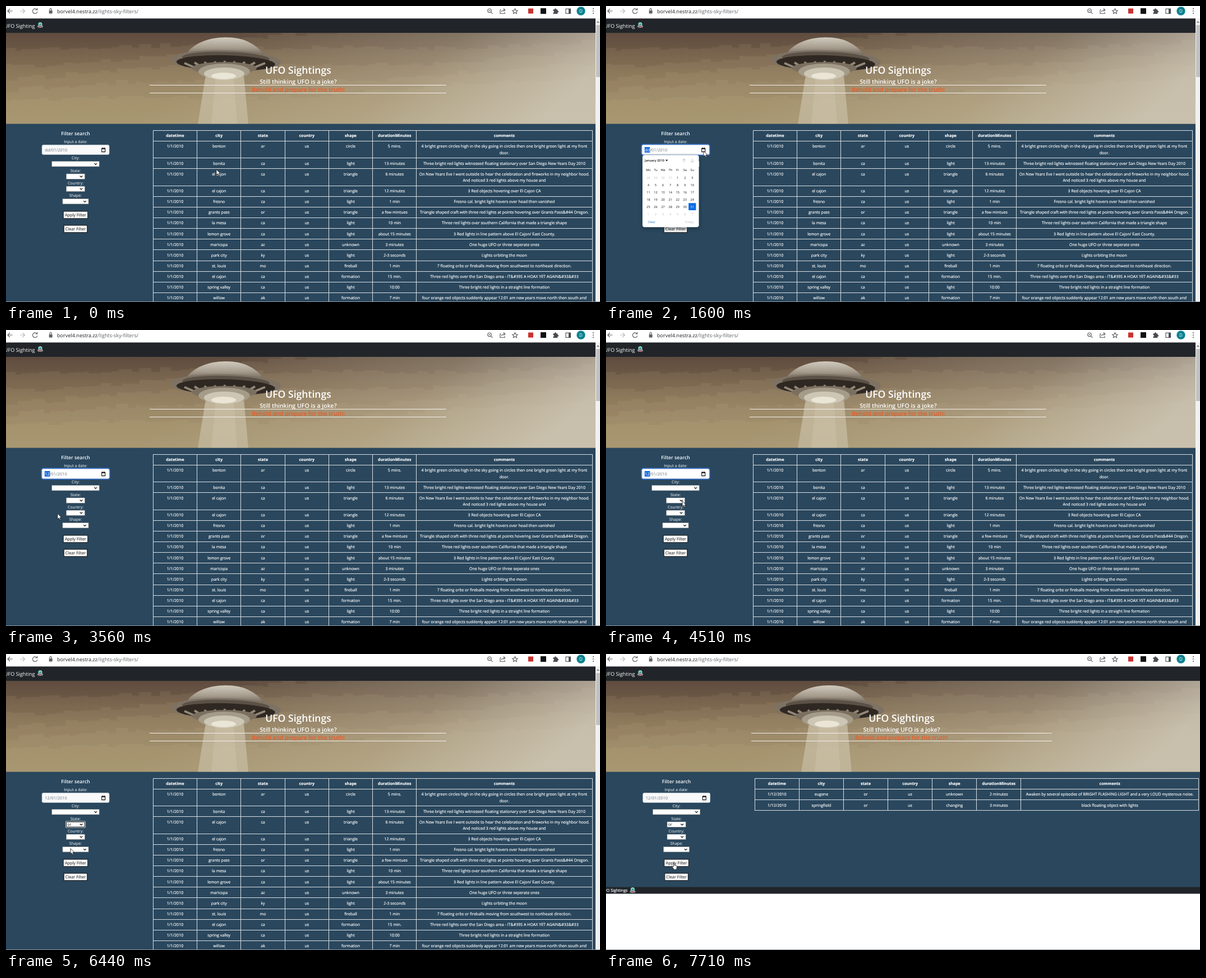
These frames come from a looping animation (1059x529 px, 8000 ms). An HTML page:

```html
<!DOCTYPE html>
<html lang="en">
<head>
<meta charset="utf-8">
<title>UFO Sightings</title>
<style>
  html, body { margin: 0; width: 100%; height: 100%; overflow: hidden; background: #fff; }
  svg { display: block; width: 1059px; height: 529px; }
  text {
    font: 7.07px "Open Sans", "Noto Sans", sans-serif;
    fill: #fff; text-rendering: geometricPrecision; white-space: pre;
  }
  .table text { stroke: #fff; stroke-width: .16px; }
  .mid { text-anchor: middle; }
  .end { text-anchor: end; }
  .th { font-weight: 700; }
  .nav { font-size: 9.1px; }
  .url { font-size: 9.1px; fill: #202124; }
  .path { fill: #5f6368; }
  .h1 { font-size: 17.6px; font-weight: 600; }
  .h2 { font-size: 10.6px; font-weight: 600; }
  .h3 { font-size: 10.3px; font-weight: 600; fill: #ee5a24; }
  .side { font-size: 8.7px; font-weight: 600; }
  .date { font-size: 7.4px; fill: #6c757d; }
  .btn { font-size: 7.3px; fill: #111; }
  .cal { font-size: 5.6px; fill: #111; }
  .opt { fill: #111; }
  .line { fill: none; stroke: #5f6368; stroke-width: 1.2; }
</style>
</head>
<body>
<svg id="stage" viewBox="0 0 1059 529">
  <defs>
    <linearGradient id="sky" x2="0" y2="1">
      <stop offset="0" stop-color="#5f4c3f"/><stop offset=".25" stop-color="#715c47"/>
      <stop offset=".5" stop-color="#816b50"/><stop offset="1" stop-color="#8f7a58"/>
    </linearGradient>
    <linearGradient id="haze" x1=".4" x2="1.05" y2=".12">
      <stop offset="0" stop-color="#d2ccbd" stop-opacity="0"/>
      <stop offset=".55" stop-color="#d2ccbd" stop-opacity=".24"/>
      <stop offset="1" stop-color="#d2ccbd" stop-opacity=".78"/>
    </linearGradient>
    <linearGradient id="dome" x2="0" y2="1">
      <stop offset="0" stop-color="#d0cabd"/><stop offset=".5" stop-color="#a89e90"/>
      <stop offset="1" stop-color="#5e5448"/>
    </linearGradient>
    <linearGradient id="beam" x2="0" y2="1">
      <stop offset="0" stop-color="#d8d0ba" stop-opacity=".6"/>
      <stop offset="1" stop-color="#d0c8b2" stop-opacity=".5"/>
    </linearGradient>
    <filter id="soft" x="-20%" y="-20%" width="140%" height="140%"><feGaussianBlur stdDeviation="3"/></filter>
    <clipPath id="heroClip"><rect y="48" width="1059" height="162.5"/></clipPath>
    <g id="badge">
      <circle cy="-1.5" r="3.6" fill="#7fd3cd"/>
      <circle cy="-1" r="1.6" fill="#2f8f8a"/>
      <ellipse cy="2.4" rx="5" ry="2.5" fill="#8fa3ad"/>
      <ellipse cy="3" rx="3.4" ry="1.1" fill="#c0504a"/>
    </g>
  </defs>

  <rect width="1059" height="529" fill="#2a475d"/>
  <rect y="22" width="1059" height="26.5" fill="#212529"/>
  <text class="nav end" x="51.5" y="39">UFO Sighting</text>
  <use href="#badge" x="61" y="34"/>

  <g clip-path="url(#heroClip)">
    <rect y="48" width="1059" height="163" fill="url(#sky)"/>
    <g id="bands"></g>
    <rect y="48" width="1059" height="163" fill="url(#haze)"/>
    <g id="hero">
      <path d="M356 124H424L432 211H342Z" fill="url(#beam)"/>
      <path d="M374 124H406L412 211H366Z" fill="#e9e4d2" opacity=".15"/>
      <path d="M318 90C332 67 360 56 392 56S446 67 464 92Z" fill="url(#dome)"/>
      <g transform="rotate(1.5 392 98)">
        <ellipse cx="392" cy="98" rx="98" ry="19" fill="#7d7264"/>
        <ellipse cx="392" cy="93" rx="78" ry="11" fill="#5b5146"/>
        <ellipse cx="392" cy="102" rx="88" ry="14" fill="#2f2822"/>
      </g>
      <g id="ribs" stroke="#948978" stroke-width="4"></g>
      <ellipse cx="389" cy="111" rx="58" ry="11" fill="#7b7060"/>
      <ellipse cx="389" cy="117" rx="46" ry="14" fill="#a59b89"/>
      <ellipse cx="389" cy="121" rx="36" ry="11" fill="#cdc6b4"/>
      <ellipse cx="388" cy="125" rx="22" ry="6" fill="#eae5d5"/>
    </g>
  </g>
  <g id="titles">
    <text class="h1 mid" x="521" y="121">UFO Sightings</text>
    <text class="h2 mid" x="521" y="139">Still thinking UFO is a joke?</text>
    <text class="h3 mid" x="521" y="153">Behold and prepare for the truth!</text>
  </g>
  <path id="rules" stroke="#f4f1ea"/>

  <g id="fullPage" class="table"></g>
  <g id="filtered" class="table">
    <rect y="416.5" width="1059" height="12" fill="#212529"/>
    <text class="end" style="font-size:7.2px" x="38.5" y="425">UFO Sightings</text>
    <use href="#badge" x="47.5" y="422"/>
    <rect y="428.5" width="1059" height="101" fill="#fff"/>
  </g>

  <g id="side"></g>
  <g id="calendar"></g>
  <g id="menu"></g>

  <g id="browser">
    <rect width="1059" height="22.3" fill="#fff"/>
    <path class="line" d="M11.5 9H3M7 5L3 9L7 13"/>
    <path class="line" style="stroke:#b9bcc0" d="M25 9H33.5M29.5 5L33.5 9L29.5 13"/>
    <path class="line" d="M55 6.3A4.3 4.3 0 1 0 56 10M55.8 3.8V7H52.5"/>
    <rect x="76.7" y="8" width="6" height="5.4" rx=".7" fill="#5f6368"/>
    <path class="line" d="M78 8V6.4A1.7 1.7 0 0 1 81.4 6.4V8"/>
    <text class="url" x="91" y="12.7">borvel4.nestra.zz<tspan class="path">/lights-sky-filters/</tspan></text>
    <circle class="line" cx="862" cy="8.3" r="3.3"/><path class="line" d="M864.5 10.8L867.5 13.8M860.5 8.3H863.5"/>
    <path class="line" d="M883 7H881V13.5H889V11M883.5 11C884 8 886 7 889.5 7M887 4.5L889.8 7L887 9.5"/>
    <path class="line" d="M907.5 4.7L908.9 7.8L912.2 8.1L909.7 10.3L910.5 13.6L907.5 11.8L904.5 13.6L905.3 10.3L902.8 8.1L906.1 7.8Z"/>
    <rect x="931" y="4.5" width="9" height="9" fill="#c8322f"/>
    <rect x="953" y="4" width="10" height="10" fill="#111"/>
    <path d="M975.5 6.3H978V5.8A1.5 1.5 0 0 1 981 5.8V6.3H983.3V8.6H983.8A1.5 1.5 0 0 1 983.8 11.6H983.3V14H975.5V11.7A1.5 1.5 0 0 0 975.5 8.7Z" fill="#4a4d51"/>
    <path class="line" d="M998 5.2H1006.5V13.3H998Z"/><path d="M1003 5H1007V13.5H1003Z" fill="#4a4d51"/>
    <circle cx="1025" cy="9" r="7.7" fill="#0b8290"/>
    <text class="mid" style="font-size:8px" x="1025" y="12">D</text>
    <g fill="#5f6368"><circle cx="1047" cy="5" r="1.1"/><circle cx="1047" cy="9" r="1.1"/><circle cx="1047" cy="13" r="1.1"/></g>
  </g>
  <rect y="528" width="1059" height="1" fill="#8d979f"/>

  <g id="cursor" stroke="#111" stroke-width=".8" fill="#fff" stroke-linejoin="round">
    <path id="arrow" d="M0 0V10L2.3 7.9L3.9 11.4L5.5 10.7L4 7.3H7Z"/>
    <path id="hand" d="M-.9 .9Q0-.6 .9 .9V4.6L2.6 4.9L4.9 5.6Q5.8 6 5.6 7.3L4.9 10.6V12.4H-.5V11L-3 7.8Q-3.2 6.3-1.8 6.8L-.9 7.6Z"/>
  </g>
</svg>
<script>
const LOOP = 8000, ROW = 19.14, LINE = 11.1, TOP = 222.3;
const CELL = 13.05, OPTION = 10.35, MENU_TOP = 310;
const $ = id => document.getElementById(id);

function add(parent, tag, attrs, content) {
  const node = document.createElementNS("http://www.w3.org/2000/svg", tag);
  for (const key in attrs) node.setAttribute(key, attrs[key]);
  if (content !== undefined) node.textContent = content;
  return parent.appendChild(node);
}
const text = (parent, x, y, str, cls = "mid") => add(parent, "text", { x, y, class: cls }, str);
const rect = (parent, x, y, width, height, fill, more) =>
  add(parent, "rect", { x, y, width, height, fill, ...more });
const show = (node, on) => node.setAttribute("visibility", on ? "visible" : "hidden");

// Hero: stepped tone bands and the ribs under the saucer
let seed = 11;
const rand = () => (seed = seed * 16807 % 2147483647) / 2147483647;
for (let band = 0; band < 5; band++) {
  let d = "M0 212";
  for (let x = 0; x < 1059; x += 9 + rand() * 18) {
    const y = 72 + band * 25 - x * .04 + Math.sin(x / 130 + band) * 7 + rand() * 9;
    d += `V${y.toFixed(1)}H${x.toFixed(1)}`;
  }
  add($("bands"), "path", { d: d + "H1059V212Z", fill: "#d3c196", opacity: .09 });
}
for (let i = -4; i <= 4; i++)
  add($("ribs"), "path", { d: `M${389 + i * 12} 112L${390 + i * 18} ${98 + Math.abs(i)}` });

// Tables
const head = "datetime|city|state|country|shape|durationMinutes|comments";
const sightings = [
  "benton|ar|circle|5 mins.|4 bright green circles high in the sky going in circles then one bright green light at my front~door.",
  "bonita|ca|light|13 minutes|Three bright red lights witnessed floating stationary over San Diego New Years Day 2010",
  "el cajon|ca|triangle|6 minutes|On New Years Eve I went outside to hear the celebration and fireworks in my neighbor hood.~And noticed 3 red lights above my house and",
  "el cajon|ca|triangle|12 minutes|3 Red objects hovering over El Cajon CA",
  "fresno|ca|light|1 min|Fresno cal. bright light hovers over head then vanished",
  "grants pass|or|triangle|a few mintues|Triangle shaped craft with three red lights at points hovering over Grants Pass&#44 Oregon.",
  "la mesa|ca|light|10 min|Three red lights over southern California that made a triangle shape",
  "lemon grove|ca|light|about 15 minutes|3 Red lights in line pattern above El Cajon/ East County.",
  "maricopa|az|unknown|3 minutes|One huge UFO or three seperate ones",
  "park city|ky|light|2-3 seconds|Lights orbiting the moon",
  "st. louis|mo|fireball|1 min|7 floating orbs or fireballs moving from southwest to northeast direction.",
  "el cajon|ca|formation|15 min.|Three red lights over the San Diego area - IT&#39S A HOAX YET AGAIN&#33&#33",
  "spring valley|ca|light|10:00|Three bright red lights in a straight line formation",
  "willow|ak|formation|7 min|four orange red objects suddenly appear 12:01 am new years move north then south and~east"
];
const matches = [
  "eugene|or|unknown|2 minutes|Awaken by several episodes of BRIGHT FLASHING LIGHT and a very LOUD mysterous noise.",
  "springfield|or|changing|3 minutes|black floating object with lights"
];

function table(parent, left, colWidth, right, day, rows) {
  const edges = [0, 1, 2, 3, 4, 5, 6].map(i => left + i * colWidth).concat(right);
  const full = rows.map(row => {
    const [city, state, ...rest] = row.split("|");
    return [day, city, state, "us", ...rest];
  });
  let y = TOP, d = `M${left} ${y}H${right}`;
  [head.split("|"), ...full].forEach((cells, r) => {
    let lines = 1;
    cells.forEach((cell, c) => cell.split("~").forEach((part, i) => {
      lines = Math.max(lines, i + 1);
      text(parent, (edges[c] + edges[c + 1]) / 2, y + 12 + i * LINE, part, r ? "mid" : "mid th");
    }));
    y += ROW + (lines - 1) * LINE;
    d += `M${left} ${y}H${right}`;
  });
  edges.forEach(x => d += `M${x} ${TOP}V${y}`);
  add(parent, "path", { d, stroke: "#d9dfe4", fill: "none", "shape-rendering": "crispEdges" });
}
table($("fullPage"), 262.4, 78.25, 1045, "1/1/2010", sightings);
table($("filtered"), 265.3, 79.1, 1056.5, "1/12/2010", matches);

// Scrollbar
rect($("fullPage"), 1051, 22, 8, 507, "#f1f1f1");
rect($("fullPage"), 1052, 34, 7, 93, "#c1c1c1");
add($("fullPage"), "path", { d: "M1053 30L1055.5 27L1058 30Z", fill: "#777" });

// Filter form
const side = $("side");
text(side, 124, 231, "Filter search", "side mid");
["Input a date:", "City:", "State:", "Country:", "Shape:"].forEach((label, i) =>
  text(side, 124, [245, 274.3, 296.6, 318.8, 341][i], label));

const glow = rect(side, 63.3, 247.4, 121.6, 19, "none", { rx: 3.5, stroke: "#2f72d8", "stroke-width": 1.7 });
const dateBox = rect(side, 64.2, 248.3, 119.8, 17.2, "#f8f9fa", { rx: 2.5, stroke: "#ced4da", "stroke-width": .7 });
const mark = rect(side, 68.8, 252, 9.6, 10, "#1a6fe0");
const dayText = text(side, 69.2, 259.8, "dd", "date");
const restText = text(side, 78.4, 259.8, "/01/2010", "date");
add(side, "path", { d: "M170.7 254.3H176.7V260.6H170.7ZM170.7 255.2H176.7M172.2 253V254M175.2 253V254", fill: "none", stroke: "#111", "stroke-width": 1.1 });

function select(y, width) {
  const x = 124 - width / 2, r = x + width - 6.5;
  rect(side, x, y, width, 9.4, "#fff", { stroke: "#767676", "stroke-width": .6 });
  add(side, "path", { d: `M${r - 2.3} ${y + 3.6}L${r} ${y + 5.9}L${r + 2.3} ${y + 3.6}`, fill: "none", stroke: "#111", "stroke-width": 1.2 });
}
select(277.6, 84.5);
select(299.9, 33.2);
select(322.1, 33.2);
select(344.5, 46.2);
const stateText = text(side, 109.2, 307.2, "or", "opt");
const ring = add(side, "g", { fill: "none" });
rect(ring, 106.6, 299.1, 34.8, 11, "none", { rx: 1, stroke: "#fff", "stroke-width": .9 });
rect(ring, 107.5, 300, 33, 9.2, "none", { rx: .8, stroke: "#111", "stroke-width": 1 });

[["Apply Filter", 367, 43.6], ["Clear Filter", 392, 41.6]].forEach(([label, y, w]) => {
  rect(side, 124 - w / 2, y, w, 12.8, "#f8f8f8", { stroke: "#111", "stroke-width": 1 });
  text(side, 124, y + 9, label, "btn mid");
});

// Date picker
const cal = $("calendar");
rect(cal, 65, 268, 101, 130, "#0b1a26", { rx: 4, opacity: .5, filter: "url(#soft)" });
rect(cal, 65, 266.3, 100.6, 129, "#fff", { rx: 4 });
const hover = rect(cal, 0, 0, CELL, 12.6, "#e4e7ea");
text(cal, 69, 278, "January 2010", "cal").style.fontWeight = 600;
add(cal, "path", { d: "M106 274.8H110.4L108.2 277.4Z", fill: "#111" });
add(cal, "path", { d: "M139 279.5V273M136 276L139 273L142 276M154 273V279.5M151 276.5L154 279.5L157 276.5", fill: "none", stroke: "#b5b8bb", "stroke-width": .9 });
rect(cal, 147.2, 352.2, 13.2, 12.8, "#0b6be3");
const colX = i => 75.5 + i * CELL;
"Mo Tu We Th Fr Sa Su".split(" ").forEach((d, i) => text(cal, colX(i), 295.2, d, "cal mid"));
for (let i = 0; i < 42; i++) {
  const n = i - 3, inside = n > 0 && n < 32;
  const label = text(cal, colX(i % 7), 309 + 13 * Math.floor(i / 7), n < 1 ? n + 31 : n > 31 ? n - 31 : n, "cal mid");
  label.style.fill = n === 31 ? "#fff" : inside ? "#111" : "#b9bcbf";
}
text(cal, 74.5, 388, "Clear", "cal").style.fill = "#1a6fe0";
text(cal, 156, 388, "Today", "cal end").style.fill = "#b9bcbf";

// State list
const menu = $("menu");
const states = " ar ca or az ky mo ak fl nj tx wa ny ga mi pa nc oh il wi".split(" ");
rect(menu, 107.4, MENU_TOP, 33.6, OPTION * states.length, "#fff", { stroke: "#767676", "stroke-width": .6 });
const picked = rect(menu, 107.7, MENU_TOP, 33, OPTION, "#1967d2");
const options = states.map((s, i) => text(menu, 109.5, MENU_TOP + 7.6 + i * OPTION, s, "opt"));

// Pointer trips: begin, finish, steps, then start, bend and stop points
const trips = [
  [150, 990, 7, 375, 292, 300, 312, 174, 259],
  [2160, 3060, 8, 174, 259, 84, 329, 87, 333],
  [3560, 4510, 8, 87, 333, 106, 312, 136, 305.5],
  [5180, 6020, 7, 136, 305.5, 128, 335, 115, 347.5],
  [6730, 7280, 5, 115, 347.5, 116, 362, 121, 372.8]
];
function pointer(t) {
  let pos = [375, 292];
  for (const [begin, finish, steps, x0, y0, x1, y1, x2, y2] of trips) {
    if (t < begin) break;
    const step = 1 + Math.floor((t - begin) / (finish - begin) * (steps - 1) + .03);
    const p = Math.min(1, step / steps), q = 1 - p;
    const bend = (a, b, c) => q * q * a + 2 * p * q * b + p * p * c;
    pos = [bend(x0, x1, x2), bend(y0, y1, y2)];
  }
  return pos;
}

function draw(t) {
  const within = (a, b) => t >= a && t < b;
  const done = t >= 7710;
  const [x, y] = pointer(t);

  show($("fullPage"), !done);
  show($("filtered"), done);
  $("hero").setAttribute("transform", `translate(${done ? 6 : 0})`);
  $("titles").setAttribute("transform", `translate(${done ? 6 : 0})`);
  $("rules").setAttribute("d", done ? "M259 141.5H795M259 155.5H795" : "M256 141.5H785M256 155.5H785");
  side.setAttribute("transform", `translate(${done ? 1.6 : 0})`);

  const focus = within(1450, 4660);
  show(glow, focus);
  show(mark, focus);
  dateBox.setAttribute("fill", focus ? "#fff" : "#f8f9fa");
  dayText.textContent = t < 3560 ? "dd" : "12";
  dayText.style.fill = focus ? "#fff" : "#6c757d";
  restText.setAttribute("x", t < 3560 ? 78.4 : 77.9);
  show(stateText, t >= 6320);
  show(ring, within(4660, 7590));

  const calOpen = within(1600, 3560);
  show(cal, calOpen);
  const col = Math.floor((x - 69) / CELL), row = Math.floor((y - 300.7) / 13);
  const day = row * 7 + col - 3;
  show(hover, calOpen && row >= 0 && col >= 0 && col < 7 && day > 0 && day < 31);
  hover.setAttribute("x", 69 + col * CELL);
  hover.setAttribute("y", 300.7 + row * 13);

  show(menu, within(4780, 6320));
  const index = Math.max(0, Math.floor((y - MENU_TOP) / OPTION));
  picked.setAttribute("y", MENU_TOP + index * OPTION);
  options.forEach((o, i) => o.style.fill = i === index ? "#fff" : "#111");

  const onButton = y > 366;
  $("cursor").setAttribute("transform", `translate(${x.toFixed(2)} ${y.toFixed(2)})`);
  show($("arrow"), !onButton);
  show($("hand"), onButton);
}

function tick() {
  draw(performance.now() % LOOP);
  requestAnimationFrame(tick);
}
tick();
</script>
</body>
</html>
```
